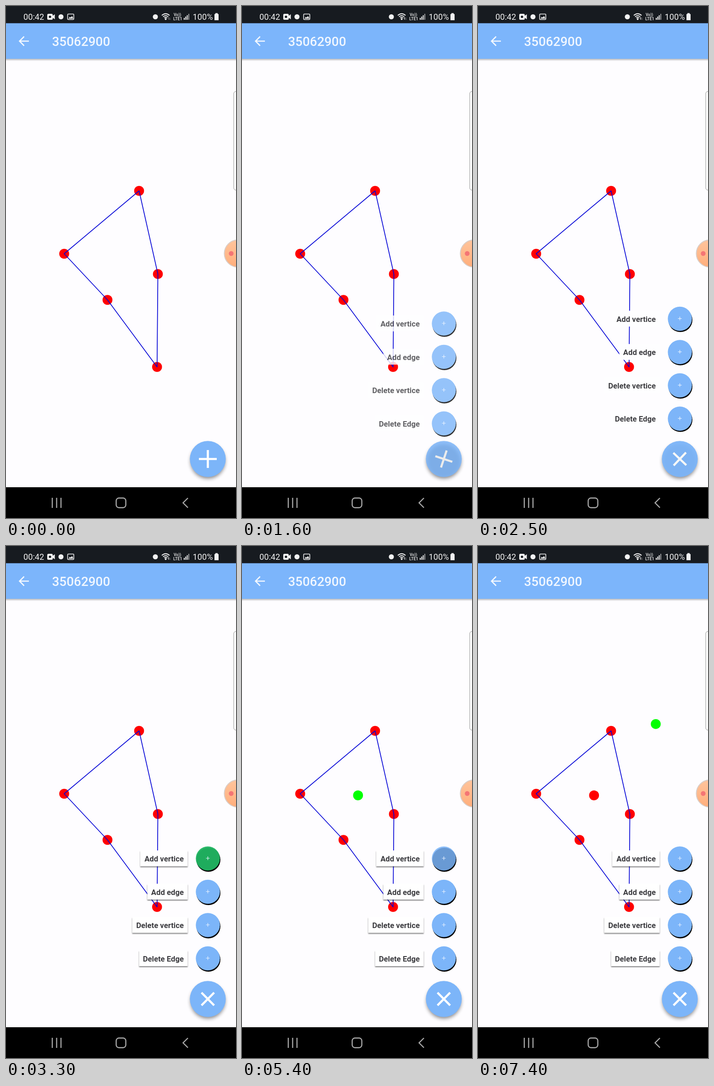
These frames come from a looping animation (502x1115 px, 8 s). An HTML page:

```html
<!DOCTYPE html>
<html lang="en">
<head>
<meta charset="utf-8">
<style>
  html, body { margin: 0; width: 100%; height: 100%; overflow: hidden; background: #fefdff; }
  svg { display: block; width: 502px; height: 1115px; font-family: Roboto, sans-serif; }
</style>
</head>
<body>
<svg viewBox="0 0 502 1115" fill="none">
  <defs>
    <linearGradient id="barShade" x2="0" y2="1">
      <stop stop-color="#000" stop-opacity=".27"/><stop offset="1" stop-color="#000" stop-opacity="0"/>
    </linearGradient>
    <linearGradient id="peach" x2="0" y2="1">
      <stop stop-color="#ffc49c"/><stop offset="1" stop-color="#ffae7c"/>
    </linearGradient>
    <filter id="blur" x="-30%" y="-30%" width="160%" height="160%"><feGaussianBlur stdDeviation="4"/></filter>
    <filter id="soft" x="-10%" y="-30%" width="120%" height="170%"><feGaussianBlur stdDeviation="1.3"/></filter>
  </defs>

  <rect width="502" height="1115" fill="#fefdff"/>
  <g id="vertices" fill="#f00"></g>
  <path id="edges" stroke="#0505d6" stroke-width="1.7" stroke-linejoin="round"/>

  <!-- edge panel and floating bubble -->
  <rect x="497" y="186" width="30" height="215" rx="5" fill="#fff" stroke="#929292"/>
  <circle cx="506" cy="539" r="29.5" fill="url(#peach)" stroke="#d9cdc8" stroke-width="2"/>
  <circle cx="491.5" cy="539" r="5.2" fill="#f47575"/>

  <g id="menu"></g>

  <g id="fab">
    <circle cx="440.5" cy="991.5" r="37.5" fill="#000" opacity=".48" filter="url(#blur)"/>
    <g id="fabFace">
      <circle cx="440.5" cy="986.5" r="39.2" fill="#7cb5f9"/>
      <path id="cross" d="M-19.5 0H19.5M0-19.5V19.5" stroke="#fff" stroke-width="4.6"/>
    </g>
  </g>

  <!-- app bar -->
  <rect y="115" width="502" height="5" fill="url(#barShade)"/>
  <rect y="37" width="502" height="78" fill="#7cb5fb"/>
  <path d="M50 76.5H30M39.5 66.5L29.5 76.5L39.5 86.5" stroke="#f3f8ff" stroke-width="2.6"/>
  <text x="100.5" y="87" font-size="27.9" font-weight="500" fill="#f1f7ff">35062900</text>

  <!-- status bar -->
  <rect width="502" height="37.5" fill="#171b20"/>
  <g fill="#f2f2f2">
    <text x="38" y="30" font-size="18.2">00:42</text>
    <text x="407.5" y="30" font-size="18.2">100%</text>
    <rect x="90" y="17" width="12" height="13" rx="2.5"/>
    <path d="M101 22L106.5 18V29L101 25Z"/>
    <circle cx="96" cy="23.5" r="2.6" fill="#171b20"/>
    <circle cx="120" cy="23.5" r="5.5"/>
    <path d="M136.500 27.500L139.500 23.500L141.500 25.500L144 21.500L147 27.500Z"/>
    <circle cx="326" cy="23.500" r="5.500"/>
    <text x="366" y="21.500" font-size="8.500" font-weight="500">Vo))</text>
    <text x="365" y="31" font-size="9" font-weight="500">LTE1</text>
    <path d="M388 26h2v4h-2zM391.300 23h2v7h-2zM394.600 20h2v10h-2z"/>
    <path d="M398 17h2v13h-2z" opacity=".6"/>
    <path d="M457 15.500h5v2h2v13.500h-9V17.500h2z"/>
    <circle cx="348.500" cy="28.500" r="2"/>
  </g>
  <rect x="134.500" y="17.500" width="13.500" height="12" rx="1.500" stroke="#f2f2f2" stroke-width="1.600"/>
  <path d="M340 20.500Q348.500 13 357 20.500M342.700 23.500Q348.500 18.500 354.300 23.500M345.500 26Q348.500 23.500 351.500 26" stroke="#f2f2f2" stroke-width="1.700"/>
  <path d="M357.500 25V30M356 28.500L357.500 30L359 28.500" stroke="#777"/>
  <path id="upload" d="M354.500 30V25M353 26.500L354.500 25L356 26.500"/>

  <!-- navigation bar -->
  <rect y="1048" width="502" height="67" fill="#000"/>
  <g stroke="#a9a9a9" stroke-width="2.400">
    <path d="M101 1071V1093M110.500 1071V1093M120 1071V1093M397 1071.500L386.500 1082L397 1092.500"/>
    <rect x="240.500" y="1071.500" width="21" height="21" rx="6"/>
  </g>
</svg>
<script>
const LOOP = 8000, STEP = 100;
const BLUE = '#7cb5f9', GREEN = '#21b662', RED = '#f00', LIME = '#0f0';
const $ = id => document.getElementById(id);

const corners = [[290.5, 402.5], [127, 539.5], [221.5, 640], [329.7, 786], [331.5, 583.7]];
const added = [[253.3, 543], [388, 387.7]];
const items = [['Add vertice', 293], ['Add edge', 308.5], ['Delete vertice', 275.5], ['Delete Edge', 290.5]];

$('vertices').innerHTML = [...corners, ...added]
  .map(([x, y]) => `<circle cx="${x}" cy="${y}" r="10.8"/>`).join('');
$('edges').setAttribute('d', 'M' + corners.join('L') + 'Z');

$('menu').innerHTML = items.map(([label, left], i) => {
  const y = 680.5 + i * 72.5, width = 396.5 - left;
  return `<g>
    <rect class="shade" x="${left}" y="${y - 15}" width="${width}" height="34" fill="#000" opacity=".5" filter="url(#soft)"/>
    <rect x="${left}" y="${y - 17.5}" width="${width}" height="34.5" fill="#fff"/>
    <text x="388" y="${y + 6.7}" text-anchor="end" font-size="16.7" font-weight="700" fill="#3c3c40">${label}</text>
    <circle cx="441.7" cy="${y + 2.7}" r="26.3" fill="#000"/>
    <circle class="disc" cx="440.6" cy="${y}" r="26.3" fill="${BLUE}"/>
    <path d="M436.500 ${y - .5}h8M440.500 ${y - 4.5}v8" stroke="#e8f2ff" stroke-width="1.100"/>
  </g>`;
}).join('');

const menuItems = [...$('menu').children];
const shades = document.querySelectorAll('.shade');
const firstDisc = document.querySelector('.disc');
const [firstAdded, secondAdded] = [...$('vertices').children].slice(-2);

// Underdamped spring from 0 to 1, settled after 400 ms
function spring(ms) {
  if (ms < 30) return 0;
  if (ms > 400) return 1;
  const s = ms / 1000, w = 10.45;
  return 1 - Math.exp(-11 * s) * (Math.cos(w * s) + 11 / w * Math.sin(w * s));
}

// Opacity dip of a pressed button
const press = age => age < 0 || age > 300 ? 1 : Math.min(1, .85 + age / 1000);
const between = (t, from, to) => t >= from && t < to;

function draw(t) {
  const open = t < 1550 ? spring(t + 20)
    : t < 2250 ? 1 - spring(t - 1550)
    : spring(t - 2280);

  menuItems.forEach(item => {
    item.setAttribute('opacity', Math.max(0, Math.min(1, open)));
    item.setAttribute('transform', `translate(0 ${56 * (1 - open)})`);
  });
  shades.forEach(shade => shade.setAttribute('visibility', open < 1 ? 'hidden' : 'visible'));

  $('cross').setAttribute('transform', `translate(440.5 986.5) rotate(${135 * open})`);
  $('fabFace').setAttribute('opacity', press(t - 100) * press(t - 1600) * press(t - 2400));

  const active = between(t, 3300, 4000) || between(t, 5500, 7000);
  firstDisc.setAttribute('fill', active ? GREEN : BLUE);
  firstDisc.setAttribute('opacity', press(t - 3200) * press(t - 5400));

  firstAdded.setAttribute('visibility', t < 4300 ? 'hidden' : 'visible');
  firstAdded.setAttribute('fill', t < 7400 ? LIME : RED);
  secondAdded.setAttribute('visibility', t < 7400 ? 'hidden' : 'visible');
  secondAdded.setAttribute('fill', LIME);
  $('upload').setAttribute('stroke', t < 1200 ? '#777' : '#f2f2f2');
}

const start = performance.now();
function tick() {
  const t = (performance.now() - start) % LOOP;
  draw(Math.floor(t / STEP) * STEP);
  requestAnimationFrame(tick);
}
tick();
</script>
</body>
</html>
```
